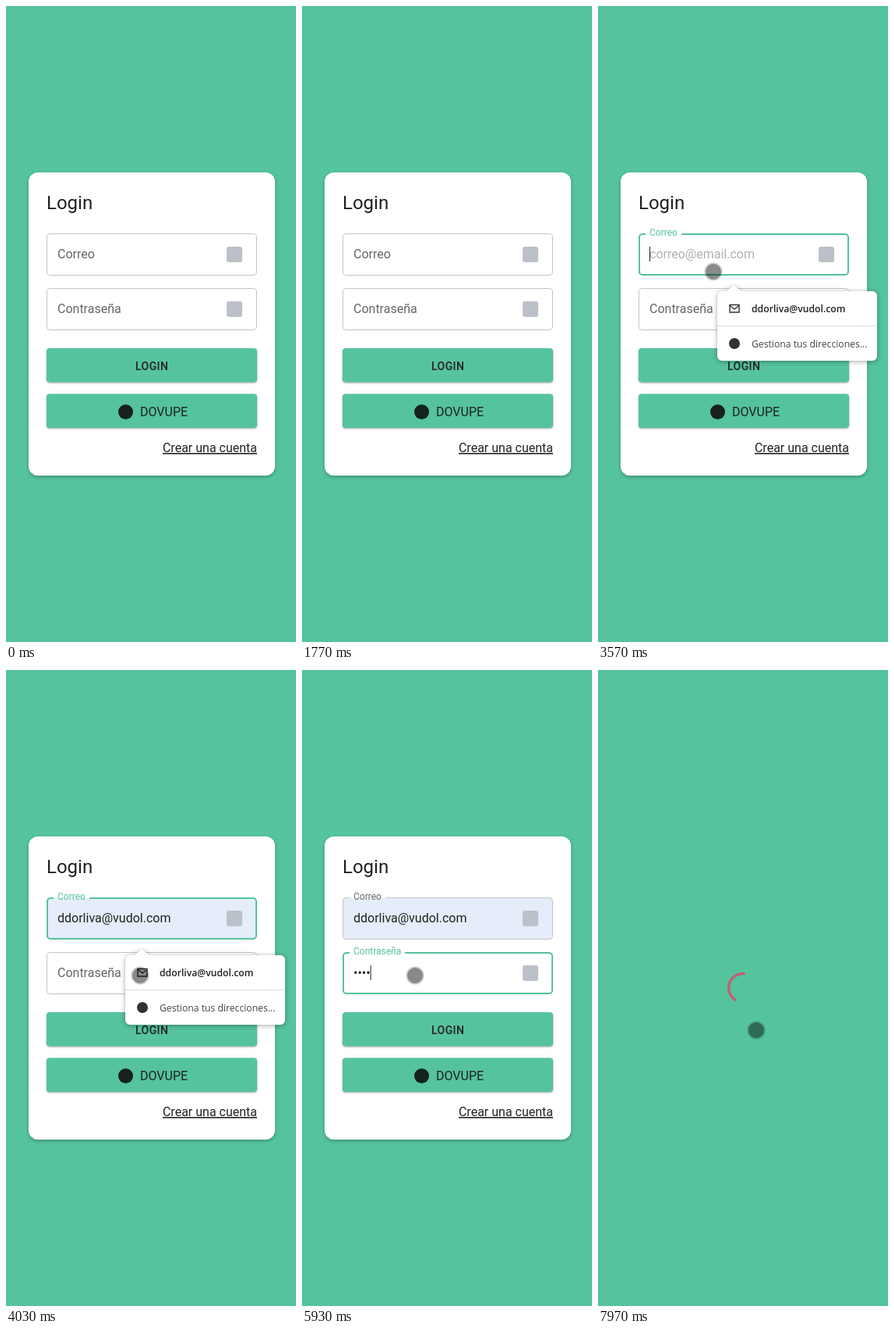
These frames come from a looping animation (372 by 814 pixels, 8 s). An HTML page:

```html
<!DOCTYPE html>
<html lang="es">
<head>
<meta charset="utf-8">
<title>Login</title>
<style>
  html, body { margin: 0; width: 100%; height: 100%; overflow: hidden; background: #55c39c; }
  svg { display: block; width: 100%; height: 100%; font: 16px Roboto, sans-serif; }
  text { fill: #212121; white-space: pre; }
  .card { fill: #fff; filter: drop-shadow(0 2px 2px rgba(0,0,0,.24)); }
  .button { fill: #55c39c; filter: drop-shadow(0 1px 1px rgba(0,0,0,.35)); }
  .menu { fill: #fff; filter: drop-shadow(0 1px 3px rgba(0,0,0,.35)); }
  .menu-text { font: 12.2px "Open Sans", sans-serif; }
  .badge { fill: #bcc0c9; }
  .border { fill: none; }
</style>
</head>
<body>
<svg viewBox="0 0 372 814">
  <rect width="372" height="814" fill="#55c39c"/>
  <g id="form">
    <rect class="card" x="29" y="213" width="316" height="388" rx="12"/>
    <text x="52" y="260" font-size="24">Login</text>
    <g id="fields"></g>
    <rect class="button" x="52" y="438" width="270" height="43.5" rx="4"/>
    <text x="187.2" y="466" font-size="14" font-weight="500" letter-spacing=".4" text-anchor="middle">LOGIN</text>
    <rect class="button" x="52" y="496.5" width="270" height="43.5" rx="4"/>
    <circle cx="153.5" cy="519.5" r="9.5" fill="#17211d"/>
    <text x="172" y="525">DOVUPE</text>
    <text x="322" y="571" text-anchor="end" text-decoration="underline">Crear una cuenta</text>
  </g>
  <g id="menu">
    <path class="menu" d="M159 365H164L174 357.500L184 365H352a6 6 0 0 1 6 6V448a6 6 0 0 1-6 6H159a6 6 0 0 1-6-6V371a6 6 0 0 1 6-6Z"/>
    <path d="M153 409.500H358" stroke="#dedede"/>
    <path d="M169 382.500H181V392H169ZM169 383.500L175 387.800L181 383.500" fill="none" stroke="#333" stroke-width="1.4"/>
    <text class="menu-text" x="197" y="392" font-weight="600" style="font-weight:600">ddorliva@vudol.com</text>
    <circle cx="175" cy="432" r="7" fill="#303234"/>
    <text class="menu-text" x="197" y="437" style="fill:#444">Gestiona tus direcciones...</text>
  </g>
  <circle id="spinner" r="20.2" fill="none" stroke="#c85a78" stroke-width="3.6"/>
  <g id="cursor">
    <circle r="11.600" fill="#000" fill-opacity=".2"/>
    <circle r="9.500" fill="#000" fill-opacity=".32" stroke="#000" stroke-opacity=".2"/>
  </g>
</svg>
<script>
const LOOP = 8000, GREEN = '#55c39c';
const EMAIL_FOCUS = 3170, MENU_OPEN = 3230, PREVIEW = 3800, PICK = 4230;
const PASSWORD_FOCUS = 4870, SUBMIT = 7600;
const KEYS = [5600, 5730, 5800, 5930, 6070, 6130, 6270, 6430];

// time, x, y of the touch pointer
const PATH = [
  [70, 321, 430], [400, 230, 370], [830, 146, 300], [1200, 160, 360],
  [1430, 240, 400], [1570, 326, 420], [2270, 321, 430], [2700, 200, 370],
  [2900, 139, 315], [3130, 146, 338], [3570, 148, 340], [3650, 148, 341],
  [3900, 170, 388], [4030, 172, 391], [4260, 172, 391], [4470, 151, 393],
  [4900, 145, 391], [6970, 145, 391], [7300, 203, 461], [LOOP, 203, 461]
];

const $ = id => document.getElementById(id);
const show = (el, on) => el.setAttribute('display', on ? 'inline' : 'none');
const set = (el, attrs) => { for (const k in attrs) el.setAttribute(k, attrs[k]); };
const clamp = v => Math.min(1, Math.max(0, v));
const mix = (a, b, k) => a + (b - a) * k;
const easeOut = k => 1 - (1 - k) ** 3;

function easeInOut(x) {
  // cubic-bezier(.42, 0, .58, 1) solved by bisection
  let lo = 0, hi = 1;
  for (let i = 0; i < 20; i++) {
    const s = (lo + hi) / 2;
    const bx = 3 * (1 - s) ** 2 * s * .42 + 3 * (1 - s) * s * s * .58 + s ** 3;
    if (bx < x) lo = s; else hi = s;
  }
  return lo * lo * (3 - 2 * lo);
}

function make(tag, attrs, parent) {
  const el = document.createElementNS('http://www.w3.org/2000/svg', tag);
  set(el, attrs);
  return parent.appendChild(el);
}

function makeField(y, name, notch) {
  const g = make('g', { transform: `translate(0 ${y})` }, $('fields'));
  const fill = make('rect', { x: 53, y: 1, width: 268, height: 53, rx: 3 }, g);
  const border = make('path', { class: 'border' }, g);
  const label = make('text', {}, g);
  label.textContent = name;
  const value = make('text', { x: 66, y: 32 }, g);
  const caret = make('rect', { y: 17, width: 1, height: 19, fill: '#222' }, g);
  make('rect', { class: 'badge', x: 283, y: 17, width: 20, height: 20, rx: 3 }, g);

  return ({ raised, focused, text, color, filled, caretOn }) => {
    const inset = focused ? 1 : .5;
    const left = 52 + inset, right = 322 - inset, top = inset, bottom = 54 - inset;
    const gapEnd = mix(61, notch, raised);
    set(border, {
      d: `M${gapEnd} ${top}H${right - 4}a4 4 0 0 1 4 4V${bottom - 4}a4 4 0 0 1-4 4` +
         `H${left + 4}a4 4 0 0 1-4-4V${top + 4}a4 4 0 0 1 4-4H61`,
      stroke: focused ? GREEN : '#c4c4c4',
      'stroke-width': inset * 2
    });
    fill.style.fill = filled ? '#e4edf9' : '#fff';
    set(label, { transform: `translate(66 ${mix(32, 3, raised)}) scale(${mix(1, .75, raised)})` });
    label.style.fill = focused ? GREEN : '#666';
    if (value.textContent !== text) value.textContent = text;
    value.style.fill = color;
    show(caret, caretOn);
    if (caretOn) caret.setAttribute('x', 66 + (color === '#212121' && text ? value.getComputedTextLength() : 0));
  };
}

const drawEmail = makeField(291, 'Correo', 107);
const drawPassword = makeField(361, 'Contraseña', 132);

// The caret restarts its blink at the latest of the given times
function blink(t, resets) {
  const last = resets.filter(r => r <= t).pop();
  return last !== undefined && (t - last) % 1000 < 500;
}

function drawFields(t) {
  const emailFocused = t >= EMAIL_FOCUS && t < PASSWORD_FOCUS;
  const filled = t >= PREVIEW;
  const emailUp = easeOut(clamp((t - EMAIL_FOCUS) / 200));
  drawEmail({
    raised: emailUp,
    focused: emailFocused,
    filled,
    text: filled ? 'ddorliva@vudol.com' : emailUp > .5 ? 'correo@email.com' : '',
    color: filled ? '#212121' : '#b0b0b0',
    caretOn: emailFocused && blink(t, [EMAIL_FOCUS, PICK])
  });
  drawPassword({
    raised: easeOut(clamp((t - PASSWORD_FOCUS) / 200)),
    focused: t >= PASSWORD_FOCUS,
    filled: false,
    text: '•'.repeat(KEYS.filter(k => k <= t).length),
    color: '#212121',
    caretOn: blink(t, [PASSWORD_FOCUS, ...KEYS])
  });
}

function drawCursor(t) {
  const visible = t >= 70 && t < 1570 || t >= 2270;
  show($('cursor'), visible);
  if (!visible) return;
  const i = PATH.findIndex(p => p[0] > t);
  const [t0, x0, y0] = PATH[i - 1], [t1, x1, y1] = PATH[i];
  const k = (t - t0) / (t1 - t0);
  set($('cursor'), { transform: `translate(${mix(x0, x1, k)} ${mix(y0, y1, k)})` });
}

function drawSpinner(t) {
  show($('spinner'), t >= SUBMIT);
  if (t < SUBMIT) return;
  const phase = (t - SUBMIT) / 1400 % 1;
  const grow = easeInOut(clamp(phase * 2));
  const slide = easeInOut(clamp(phase * 2 - 1));
  set($('spinner'), {
    transform: `translate(186 407) rotate(${phase * 360}) scale(${40 / 44})`,
    'stroke-dasharray': `${mix(1, 100, grow)} 200`,
    'stroke-dashoffset': -15 * grow - 110 * slide
  });
}

function render(t) {
  show($('form'), t < SUBMIT);
  show($('menu'), t >= MENU_OPEN && t < PICK);
  drawFields(t);
  drawCursor(t);
  drawSpinner(t);
}

const start = performance.now();
function tick() {
  render((performance.now() - start) % LOOP);
  requestAnimationFrame(tick);
}
tick();
</script>
</body>
</html>
```
